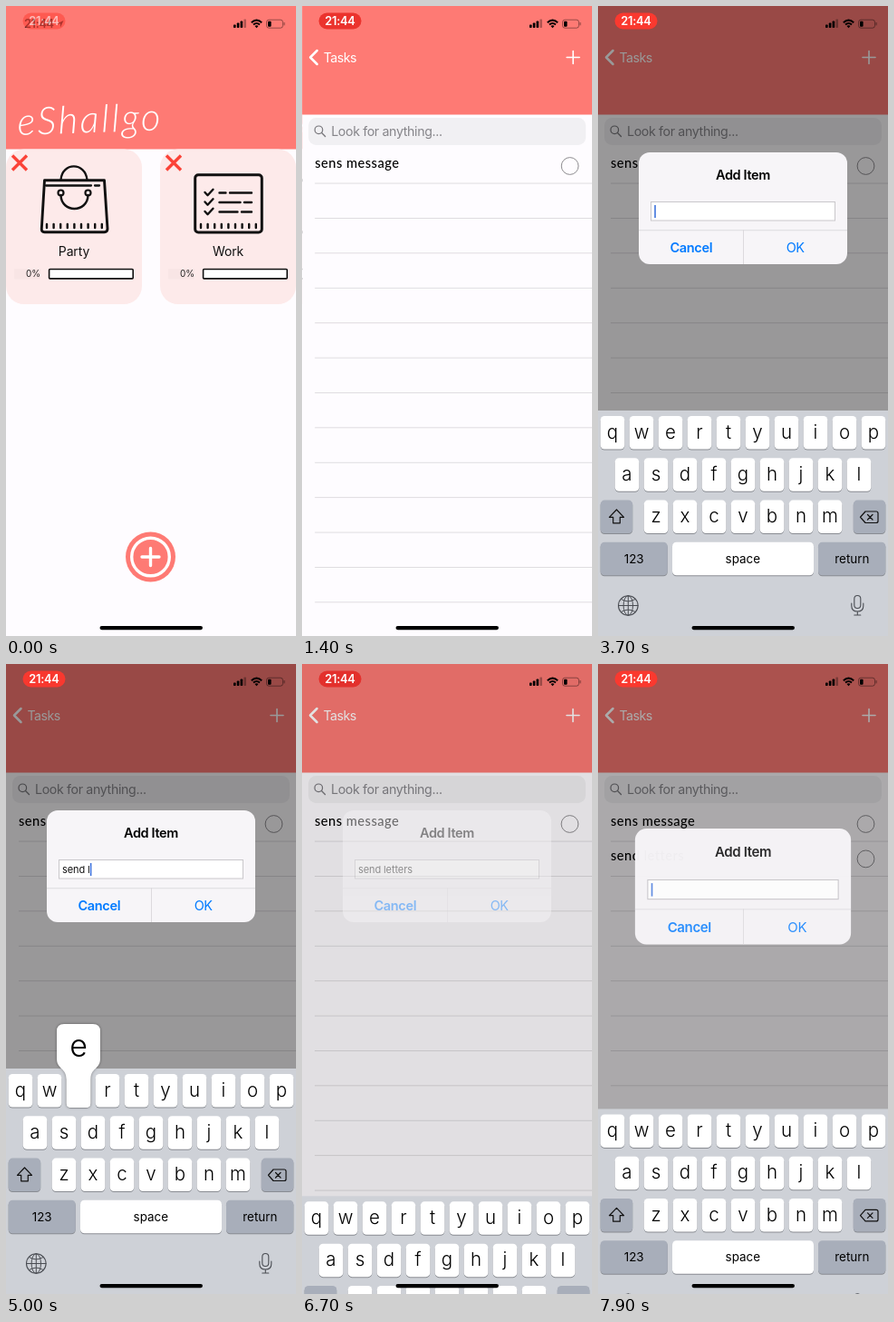
Write an HTML page that moves like this. It is 320x693 px and loops after 8 s.

```html
<!DOCTYPE html>
<html lang="en">
<head>
<meta charset="utf-8">
<title>To-do list</title>
<style>
  html, body { margin: 0; width: 100%; height: 100%; overflow: hidden; background: #fefdff; }
  svg { display: block; width: 100vw; height: 100vh; }
  text { font-family: Inter, Roboto, sans-serif; white-space: pre; }
  .row { font-family: Lato, "Open Sans", sans-serif; font-weight: 500; letter-spacing: .5px; }
  .brand { font-family: Lato, sans-serif; font-style: italic; font-weight: 300; letter-spacing: 2.5px; }
  .line { fill: none; stroke-linecap: round; stroke-linejoin: round; }
</style>
</head>
<body>
<svg id="stage" viewBox="0 0 320 693" preserveAspectRatio="none"></svg>
<script>
const LOOP = 8000, STEP = 100;
const CORAL = '#fe7a74', PAPER = '#fefcff', BLUE = '#007aff', INK = '#111';
const PUSH = 850, OPEN = 2476, CLOSE = 6596, ROW_ADDED = 7000, REOPEN = 7728;
const KB_HEIGHT = 248, KB_TOP = 445;

// Typed character and the time its key goes down.
const TYPING = [['s', 3900], ['e', 4100], ['n', 4200], ['d', 4400], [' ', 4500], ['l', 4800],
  ['e', 5000], ['t', 5300], ['t', 5500], ['e', 5700], ['r', 5900], ['s', 6100]];
const HOLD = 150, INSERT = 100;

// ---- drawing helpers ----
const rect = (x, y, w, h, r, fill, more = '') =>
  `<rect x="${x}" y="${y}" width="${w}" height="${h}" rx="${r}" fill="${fill}" ${more}/>`;
const line = (d, color, width, more = '') =>
  `<path class="line" d="${d}" stroke="${color}" stroke-width="${width}" ${more}/>`;
const ring = (x, y, r, color, width, fill = 'none') =>
  `<circle cx="${x}" cy="${y}" r="${r}" fill="${fill}" stroke="${color}" stroke-width="${width}"/>`;
const text = (x, y, s, size, fill = '#000', more = '') =>
  `<text x="${x}" y="${y}" font-size="${size}" fill="${fill}" ${more}>${s}</text>`;
const MID = 'text-anchor="middle"', BUTT = 'style="stroke-linecap:butt"';
const group = (id, body, more = '') => `<g id="${id}" ${more}>${body}</g>`;
const repeat = (n, f) => Array.from({ length: n }, (_, i) => f(i)).join('');

// ---- home page ----
const ticks = (x, n) => line(repeat(n, i => `M${x + i * 7.6} 240v4`), INK, 2.4);

const bag = line('M42.5 191.8H108.500L112 245Q112 248.700 108.500 248.700H42.500Q39 248.700 39.300 245Z', INK, 2.9)
  + line('M60.5 191C62 171.500 87.500 171.500 89.500 191M44 197.500H94M98 197.500H103', INK, 2.3)
  + line('M60.5 208C61 228 90 228 90.500 208', INK, 2.4)
  + ring(60.5, 205.5, 3, INK, 2.2) + ring(90.5, 205.5, 3, INK, 2.2)
  + ticks(45, 9);

const checklist = rect(208.7, 185.7, 73.6, 63.2, 3.5, 'none', `stroke="${INK}" stroke-width="3"`)
  + [205, 215.5, 226].map(y => line(`M219.5 ${y}l3 3.2l6-6.4`, INK, 2.4)).join('')
  + line('M235.5 205.5h7M247 205.5h24M235.5 216h23M263 216h8M235.5 226.5h20M260 226.5h11', INK, 2.4)
  + ticks(215, 9);

const card = (x, name, icon) =>
  rect(x, 157.5, 150, 170.5, 20, '#fdeaea')
  + line(`M${x + 7} 164.5l16 16m0-16l-16 16`, '#fb4338', 3.4, BUTT)
  + icon
  + text(x + 75, 274.5, name, 14, INK, MID + ' letter-spacing="-.15"')
  + rect(x + 9, 289, 29, 11.5, 1, '#f8e5e5')
  + text(x + 22, 298.3, '0%', 10, '#222')
  + rect(x + 47.6, 289.5, 92.6, 10.4, 1, '#fff', `stroke="${INK}" stroke-width="1.6"`);

const home = rect(0, 0, 320, 693, 0, PAPER) + rect(0, 0, 320, 157.5, 0, CORAL)
  + text(13, 142, 'eShallgo', 42, '#fff', 'class="brand" transform="rotate(-2 13 142)"')
  + card(0, 'Party', bag) + card(170, 'Work', checklist)
  + `<circle cx="159.5" cy="606" r="27.5" fill="${CORAL}"/>` + ring(159.5, 606, 20.8, '#fff', 3.4)
  + line('M150 606h19M159.5 596.5v19', '#fff', 3.4);

// ---- list page ----
const item = (i, name) => text(14, 177.5 + i * 38.4, name, 14.6, '#000', 'class="row"')
  + ring(295.5, 176 + i * 38.4, 9.4, '#8e8c90', 1);

const list = rect(0, 0, 320, 693, 0, PAPER) + rect(0, 0, 320, 119.5, 0, CORAL)
  + line('M16.5 49L9 56.5L16.5 64', '#fff', 2.5)
  + text(23.5, 61.7, 'Tasks', 14.2, '#fff', 'letter-spacing="-.5"')
  + line('M292 56.5h14M299 49.5v14', '#fff', 1.6)
  + rect(7, 123, 306, 30, 8.5, '#f1f0f3')
  + ring(18.3, 136.3, 4.3, '#77767b', 1.2) + line('M21.5 139.5l4 4', '#77767b', 1.3)
  + text(32, 143, 'Look for anything...', 14.2, '#858489', 'letter-spacing="-.35"')
  + repeat(13, i => rect(14, 194.6 + i * 38.4, 306, 0.9, 0, '#dcdadd'))
  + item(0, 'sens message') + group('added', item(1, 'send letters'));

// ---- dialog ----
const label = (x, y, s, fill, weight) =>
  text(x, y, s, 14.5, fill, `${MID} font-weight="${weight}" letter-spacing="-.35"`);

const panel = rect(45, 161, 230, 123, 12, '#f7f5f8')
  + rect(58.5, 215.5, 203, 20.5, 0, '#fff', 'stroke="#c9c7cb" stroke-width="1"');

const labels = label(160, 191.4, 'Add Item', '#000', 600)
  + text(62, 229.6, '', 11, INK, 'id="typed" letter-spacing="-.1"')
  + rect(62.2, 219, 1.6, 14, 0, '#3f74dc', 'id="caret"')
  + rect(45, 246.4, 230, 0.8, 0, '#d6d4d8') + rect(160, 246.4, 0.8, 37.6, 0, '#d6d4d8')
  + label(102.8, 271.2, 'Cancel', BLUE, 600) + label(217.7, 271.2, 'OK', BLUE, 400);

// ---- keyboard ----
const ROWS = [['qwertyuiop', 16], ['asdfghjkl', 32], ['zxcvbnm', 64]];
const keyPlace = {};
const key = (x, y, w, fill, id = '') =>
  rect(x, y + 1, w, 36.5, 4.5, '#898c92') + rect(x, y, w, 36.5, 4.5, fill, id);
const DARK = '#a8aeba';

const letters = ROWS.map(([chars, first], r) => [...chars].map((c, i) => {
  const x = first + i * 32, y = 451 + r * 46.3;
  keyPlace[c] = { x, y };
  return key(x - 13.3, y, 26.6, '#fff') + text(x, y + 24.5, c, 20.5, '#000', MID + ' font-weight="350"');
}).join('')).join('');

const keyboard = rect(0, KB_TOP, 320, KB_HEIGHT, 0, '#ced1d7') + letters
  + key(2.7, 543.6, 35.5, DARK) + key(281.8, 543.6, 35.5, DARK)
  + line('M20.5 554l-8 8.3h4.2v6.5h7.6v-6.5h4.2Z', INK, 1.2)
  + line('M295 556h12q2 0 2 2v8.5q0 2-2 2h-12l-5.5-6.25ZM297.5 559.5l5.5 5.5m0-5.5l-5.5 5.5', INK, 1.2)
  + key(2.7, 589.8, 74, DARK) + key(82, 589.8, 156, '#fff', 'id="space"') + key(243, 589.8, 74.3, DARK)
  + [[39.7, '123'], [159.8, 'space'], [280.3, 'return']]
    .map(([x, s]) => text(x, 612.5, s, 13.4, '#000', MID)).join('')
  + ring(33.3, 659.5, 10.8, '#4b4e54', 1.1)
  + line('M22.5 659.5h21.6M33.3 648.7v21.6M25.5 652.5q7.8 5 15.6 0M25.5 666.5q7.8-5 15.6 0', '#4b4e54', 1)
  + '<ellipse cx="33.3" cy="659.5" rx="5.2" ry="10.8" fill="none" stroke="#4b4e54"/>'
  + rect(282.8, 648.5, 7, 14, 3.5, 'none', 'stroke="#4b4e54" stroke-width="1.1"')
  + line('M279.8 657v3q0 6 6.5 6t6.5-6v-3M286.3 666v4M282.8 670h7', '#4b4e54', 1.1)
  + group('popup', `<path fill="#fff" d="M-24-47Q-24-55-16-55H16Q24-55 24-47V-17C24-5 13.3-7 13.3 6V32.5Q13.3 37 9 37H-9Q-13.3 37-13.3 32.5V6C-13.3-7-24-5-24-17Z"/>`
    + text(0, -19, '', 34, '#000', MID + ' id="popchar" font-weight="350"'),
    'style="filter:drop-shadow(0 .5px 1.5px rgba(0,0,0,.4))"');

// ---- status bar ----
const status = group('clock', text(20, 23.5, '21:44', 12.8, '#000', 'font-weight="600" letter-spacing="-.35"')
    + '<path d="M56 19.5l7.5-3.5l-3.5 7.5v-4Z"/>')
  + group('pill', rect(18.5, 7.5, 47, 18, 9, '#ff3b30', 'id="pillbg"')
    + text(42, 21.2, '21:44', 12.8, '#fff', MID + ' font-weight="600" letter-spacing="-.25"'))
  + repeat(4, i => rect(251 + i * 3.8, 20.6 - i * 2, 2.6, 3.4 + i * 2, 0.7, '#000', i > 2 ? 'opacity=".3"' : ''))
  + line('M270.8 18.2Q276.5 13 282.2 18.2M273 20.6Q276.5 17.5 280 20.6', '#000', 2, BUTT)
  + '<path d="M274.5 22q2-1.5 4 0l-2 2.3Z"/>'
  + rect(287.5, 15.2, 18, 9, 2.6, 'none', 'stroke="#000" stroke-opacity=".4"')
  + rect(289, 16.7, 3.6, 6, 1, '#000') + rect(306.5, 18, 1.2, 3.4, 0.6, '#000', 'opacity=".4"');

document.getElementById('stage').innerHTML =
  group('home', home) + group('list', list) + rect(0, 0, 320, 693, 0, '#000', 'id="dim"')
  + group('dialog', group('panel', panel) + group('labels', labels))
  + group('keyboard', keyboard) + status
  + rect(103.5, 682, 113.5, 4.2, 2.1, '#000');

// ---- motion ----
const el = id => document.getElementById(id);
const set = (id, attrs) => { for (const k in attrs) el(id).setAttribute(k, attrs[k]); };
const show = (id, on) => set(id, { visibility: on ? 'visible' : 'hidden' });

// Critically damped spring from 0 to 1.
function spring(ms) {
  if (ms <= 0) return 0;
  const x = 18.26 * ms / 1000;
  return 1 - (1 + x) * Math.exp(-x);
}

function drawDialog(t) {
  const start = t >= REOPEN ? REOPEN : OPEN;
  const enter = spring(t - start);
  const leave = start === OPEN ? spring(t - CLOSE) : 0;
  const shown = enter * (1 - leave);
  const centre = 346.5 - 124 * enter;
  set('dim', { opacity: 0.4 * enter * (1 - leave) ** 1.5 });
  // The panel turns solid sooner than its labels.
  set('panel', { opacity: (1 - (1 - enter) ** 2) * (1 - leave) });
  set('labels', { opacity: shown });
  set('dialog', {
    transform: `translate(160 ${centre}) scale(${1.2 - 0.2 * enter}) translate(-160 -222.5)`
  });
  set('keyboard', { transform: `translate(0 ${KB_HEIGHT * (1 - shown)})` });
  show('keyboard', shown > 0.002);

  const keys = start === OPEN ? TYPING : [];
  const typed = keys.filter(k => t >= k[1] + INSERT).map(k => k[0]).join('');
  el('typed').textContent = typed;
  const width = typed ? el('typed').getComputedTextLength() : 0;
  set('caret', { x: 62.2 + width });
  const solid = t > TYPING[0][1] && t < 6400;
  show('caret', shown > 0.002 && leave === 0 && (solid || (t - start) % 1000 < 550));

  const down = keys.filter(k => t >= k[1] && t < k[1] + HOLD).pop();
  const place = down && keyPlace[down[0]];
  show('popup', !!place);
  if (place) {
    set('popup', { transform: `translate(${place.x} ${place.y})` });
    el('popchar').textContent = down[0];
  }
  set('space', { fill: down && down[0] === ' ' ? DARK : '#fff' });
}

function draw(t) {
  const push = spring(t - PUSH);
  set('home', { transform: `translate(${-96 * push} 0)` });
  set('list', { transform: `translate(${320 * (1 - push)} 0)` });
  show('list', push > 0);
  show('added', push > 0 && t >= ROW_ADDED);

  set('clock', { opacity: Math.max(0, 0.65 - t / 300) });
  set('pill', { opacity: Math.min(1, 0.5 + t / 400) });
  const glow = 0.5 - 0.5 * Math.cos((t - 2200) / 4200 * 2 * Math.PI);
  set('pillbg', { fill: `rgb(${226 + 29 * glow},${47 + 12 * glow},${44 + 4 * glow})` });
  drawDialog(t);
}

const began = performance.now();
function tick() {
  const t = Math.max(0, performance.now() - began) % LOOP;
  draw(Math.floor(t / STEP) * STEP);
  requestAnimationFrame(tick);
}
tick();
</script>
</body>
</html>
```
